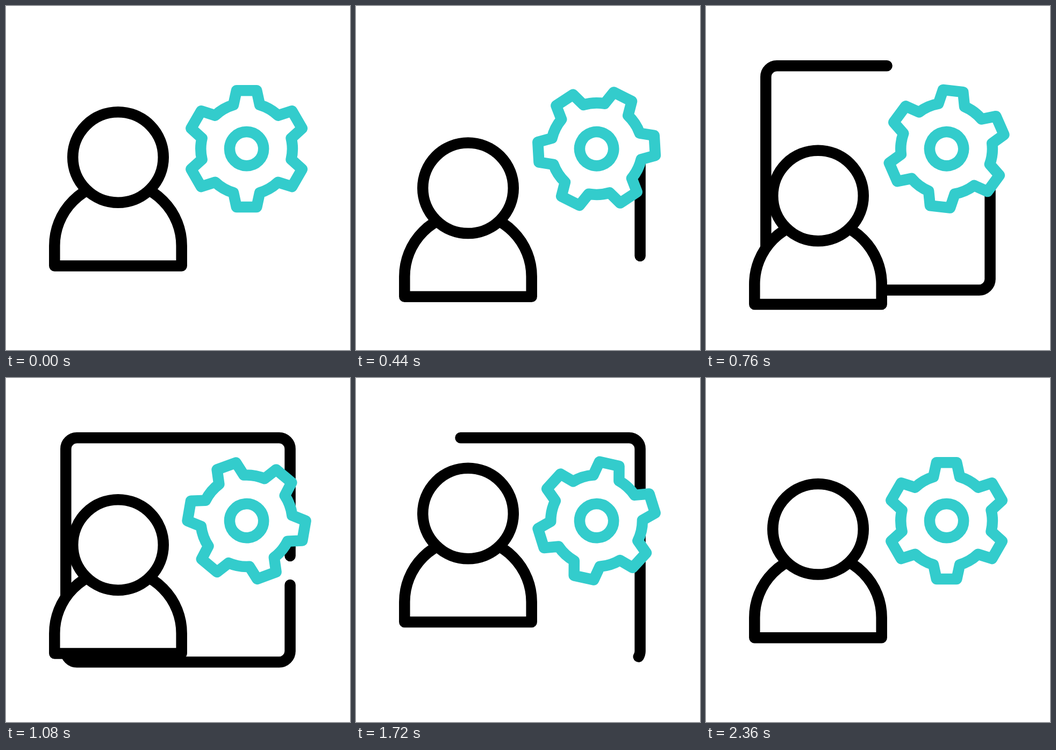
These frames come from a looping animation (640 px wide and 640 px high, 2.48 s). An HTML page:

```html
<!DOCTYPE html>
<html lang="en">
<head>
<meta charset="utf-8">
<title>User settings</title>
<style>
  html, body { margin: 0; width: 100%; height: 100%; overflow: hidden; background: #fff; }
  svg { display: block; width: 100%; height: 100%; }
  svg * { fill: #fff; stroke: #000; stroke-width: 20.5; stroke-linecap: round; stroke-linejoin: round; }
  #gear * { stroke: #3cc; }
  #frame { fill: none; }
</style>
</head>
<body>
<svg viewBox="0 0 640 640">
  <path id="frame" d="M528.6 131.8V508.1a20.5 20.5 0 0 1-20.5 20.5H131.8a20.5 20.5 0 0 1-20.5-20.5V131.8a20.5 20.5 0 0 1 20.5-20.5H508.1a20.5 20.5 0 0 1 20.5 20.5Z"/>
  <g id="person">
    <path d="M90.3 483.5V446a118.2 118.2 0 0 1 236.4 0V483.5Z"/>
    <circle cx="208.5" cy="281.5" r="84.3"/>
  </g>
  <g id="gear">
    <path id="teeth"/>
    <circle r="31.6"/>
  </g>
</svg>
<script>
const LOOP = 2480, STEP = 40;
const $ = id => document.getElementById(id);
const frame = $('frame'), person = $('person'), gear = $('gear');

// [time in ms, value]
const lift = curve([[40, 0], [440, 57.3], [600, 69.3], [700, 72.3], [760, 71.5], [1080, 29],
  [1400, -28.3], [1550, -36], [1720, -29.5], [2400, 0]]);
const turn = curve([[120, 0], [440, 26.7], [760, 66.4], [835, 69], [1080, 39.8],
  [1400, -35], [1590, -54], [1720, -47.4], [2280, 0]]);
const trimEnd = curve([[160, 0], [440, .131], [760, .761], [1080, .967], [1260, 1]]);
const trimStart = curve([[1220, 0], [1400, .103], [1720, .551], [2000, .88], [2240, 1]]);
const trimShift = t => 253.2 + .2094 * (t - 1080);

// Smooth curve through the keys, flat at both ends and at turning points.
function curve(keys) {
  const rate = i => (keys[i + 1][1] - keys[i][1]) / (keys[i + 1][0] - keys[i][0]);
  const slopes = keys.map((k, i) => {
    if (i === 0 || i === keys.length - 1) return 0;
    const a = rate(i - 1), b = rate(i);
    return a * b > 0 ? 2 * a * b / (a + b) : 0;
  });
  return t => {
    if (t <= keys[0][0]) return keys[0][1];
    const i = keys.findIndex(k => k[0] > t) - 1;
    if (i < 0) return keys[keys.length - 1][1];
    const [t0, v0] = keys[i], [t1, v1] = keys[i + 1];
    const d = t1 - t0, s = (t - t0) / d, r = 1 - s;
    return v0 * r * r * (1 + 2 * s) + v1 * s * s * (3 - 2 * s)
      + d * s * r * (slopes[i] * r - slopes[i + 1] * s);
  };
}

function gearPath() {
  const at = (r, deg) => {
    const a = deg * Math.PI / 180;
    return `${(r * Math.sin(a)).toFixed(2)} ${(-r * Math.cos(a)).toFixed(2)}`;
  };
  let d = '';
  for (let a = 0; a < 360; a += 60) {
    d += `${a ? 'A85.3 85.3 0 0 1 ' : 'M'}${at(85.3, a - 16.7)}`
      + `L${at(110, a - 9.8)}L${at(110, a + 9.8)}L${at(85.3, a + 16.7)}`;
  }
  return d + `A85.3 85.3 0 0 1 ${at(85.3, -16.7)}Z`;
}

$('teeth').setAttribute('d', gearPath());
const total = frame.getTotalLength();

function draw(t) {
  person.setAttribute('transform', `translate(0 ${lift(t)})`);
  gear.setAttribute('transform', `translate(447.6 265.7) rotate(${turn(t)})`);
  const from = trimStart(t), length = (trimEnd(t) - from) * total;
  frame.style.display = length > .5 ? '' : 'none';
  frame.style.strokeDasharray = `${length} ${total - length}`;
  frame.style.strokeDashoffset = -(trimShift(t) + from * total);
}

const begin = performance.now();
function tick() {
  const t = Math.floor((performance.now() - begin) % LOOP / STEP) * STEP;
  draw(t < 80 ? 0 : Math.min(t, 2360));
  requestAnimationFrame(tick);
}
tick();
</script>
</body>
</html>
```
